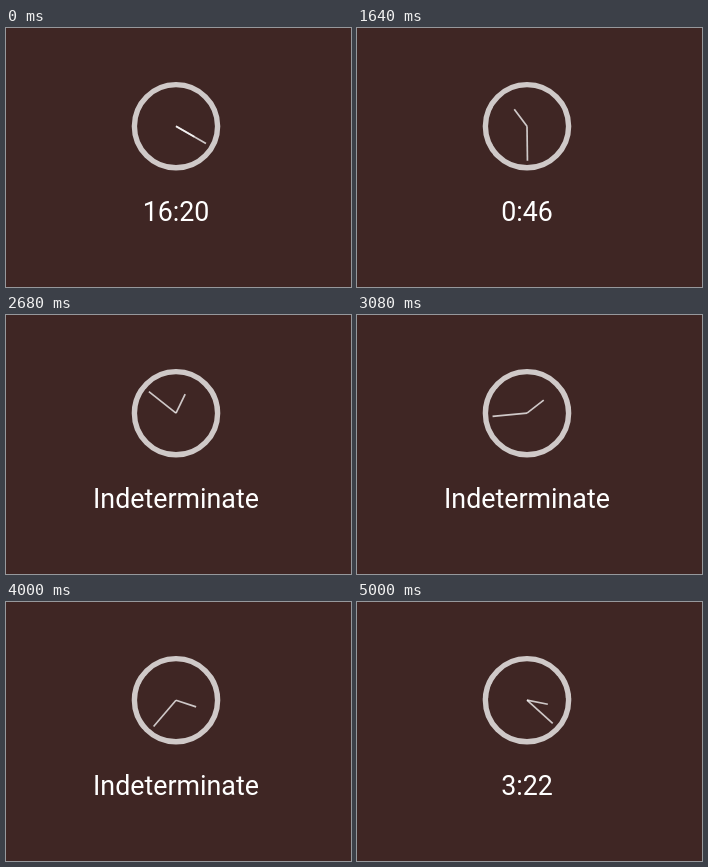
These frames come from a looping animation (345 px wide and 259 px high, 5.04 s). An HTML page:

```html
<!DOCTYPE html>
<html lang="en">
<head>
<meta charset="utf-8">
<title>Clock</title>
<style>
  html, body { margin: 0; width: 100%; height: 100%; overflow: hidden; background: #3f2624; }
  svg { display: block; width: 345px; height: 259px; }
  g { fill: none; stroke: #fff; stroke-opacity: .75; }
  text { font: 26.8px Roboto, sans-serif; fill: #fff; text-anchor: middle; }
</style>
</head>
<body>
<svg viewBox="0 0 345 259">
  <g transform="translate(170 98.2)">
    <circle r="41.6" stroke-width="5.4"/>
    <path id="hour" d="M0 0V-21.2" stroke-width="1.7"/>
    <path id="minute" d="M0 0V-34.6" stroke-width="1.7"/>
  </g>
  <text id="label" x="170" y="193"></text>
</svg>
<script>
const LOOP = 5040, MOVE = 420;

// Each state: start time, label, and [hour, minute] angles it moves between.
const states = [
  { at: 0, label: '16:20', from: [120, 120], to: [120, 120] },
  { at: 600, label: '21:18', from: [120, 120], to: [279, 108] },
  { at: 1600, label: '0:46', from: [279, 108], to: [383, 276] },
  { at: 2640, label: 'Indeterminate', spin: true },
  { at: 4560, label: '3:22', from: [142, 260], to: [101, 132] },
];

// Time and minute-hand travel in degrees while spinning.
const spinKeys = [[2640, 0], [3080, 348], [3560, 708], [4480, 1368], [4560, 1424]];

const byId = id => document.getElementById(id);
const hour = byId('hour'), minute = byId('minute'), label = byId('label');
const mix = (a, b, k) => a + (b - a) * k;

function overshoot(t) {
  const s = Math.min(t, 1) - 1;
  return s * s * (3 * s + 2) + 1;
}

function spinTravel(t) {
  const i = spinKeys.findIndex(([end]) => t < end);
  const [t0, a0] = spinKeys[i - 1], [t1, a1] = spinKeys[i];
  return mix(a0, a1, (t - t0) / (t1 - t0));
}

function handAngles(state, t) {
  if (state.spin) {
    const travel = spinTravel(t);
    return [23 + travel / 12, 276 + travel];
  }
  const k = overshoot((t - state.at) / MOVE);
  return state.from.map((a, i) => mix(a, state.to[i], k));
}

function draw(now) {
  const t = now % LOOP;
  const state = states.findLast(s => t >= s.at);
  const [h, m] = handAngles(state, t);
  hour.setAttribute('transform', `rotate(${h})`);
  minute.setAttribute('transform', `rotate(${m})`);
  if (label.textContent !== state.label) label.textContent = state.label;
}

const start = performance.now();
function tick() {
  draw(performance.now() - start);
  requestAnimationFrame(tick);
}
tick();
</script>
</body>
</html>
```
